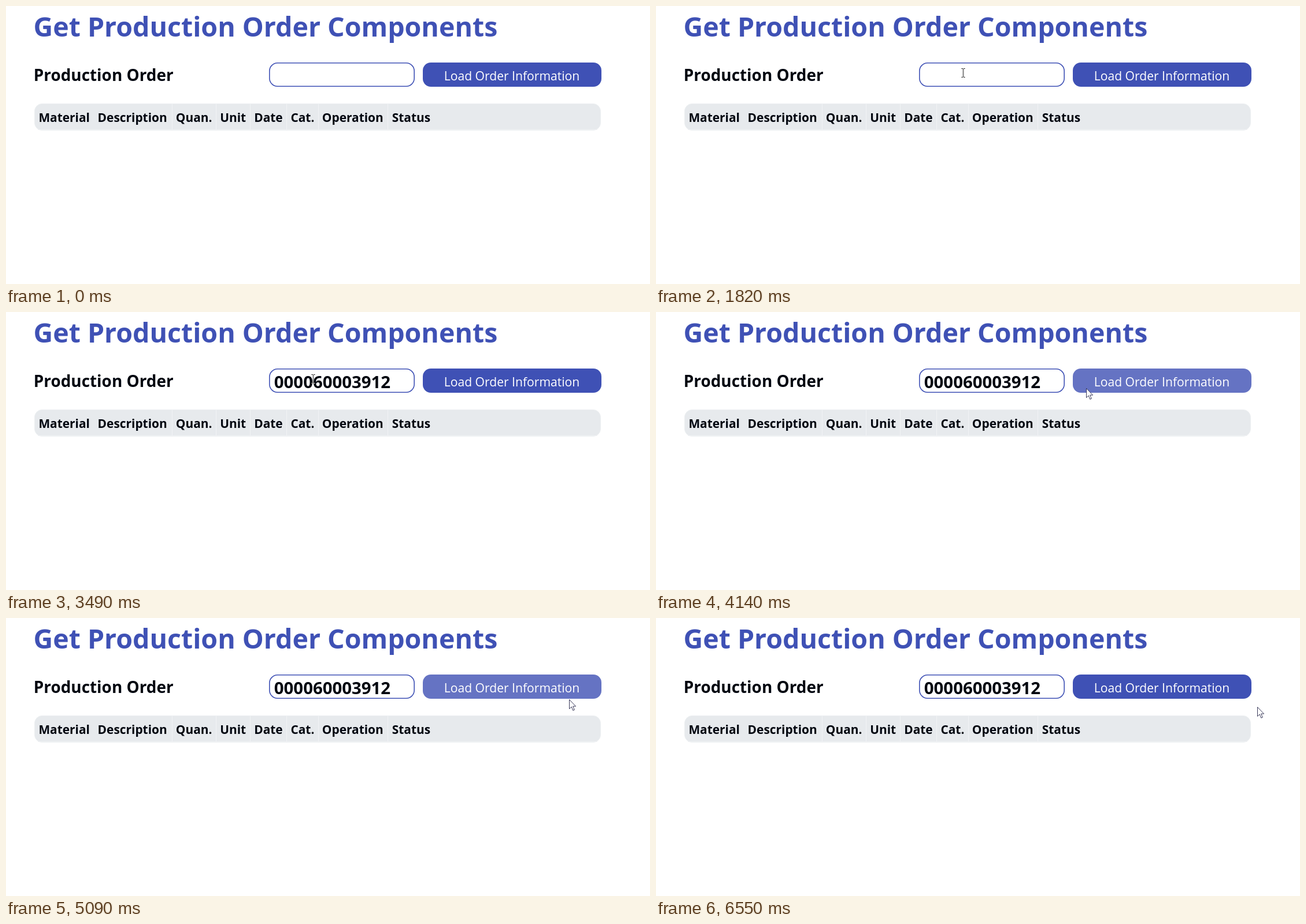
Animation of 1114x482 px, one loop 8000 ms. Source, as an HTML page:

```html
<!DOCTYPE html>
<html lang="en">
<head>
<meta charset="utf-8">
<title>Get Production Order Components</title>
<style>
  html, body { margin: 0; width: 100%; height: 100%; overflow: hidden; background: #fff; }
  svg { display: block; width: 100%; height: 100%; }
  text { font: 700 20.9px "Open Sans", "Noto Sans", sans-serif; fill: #00050f; white-space: pre; }
  .title { font-size: 46.5px; fill: #3f51b5; }
  .label { font-size: 27.9px; }
  .value { font-size: 29.4px; animation: value 8s step-end infinite; }
  .caption { font-size: 21.1px; font-weight: 400; fill: #fff; }
  .button { animation: button 8s step-end infinite; }
  .arrow { animation: move 8s infinite, arrow 8s step-end infinite; }
  .beam { mix-blend-mode: difference; animation: move 8s infinite, beam 8s step-end infinite; }
  .click { animation: click 8s step-end infinite; }

  @keyframes value {
    0% { visibility: hidden; }
    43.625%, 100% { visibility: visible; }
  }
  @keyframes button {
    0%, 64.5%, 100% { fill: #3f51b5; }
    51.75%, 62% { fill: #6573c3; }
    61.375% { fill: #8c97d3; }
  }
  @keyframes arrow {
    0%, 10.06% { visibility: hidden; }
    3.25%, 50.96%, 100% { visibility: visible; }
  }
  @keyframes beam {
    0%, 50.96%, 100% { visibility: hidden; }
    10.06% { visibility: visible; }
  }
  @keyframes click {
    0%, 17.75%, 29.375%, 62%, 100% { visibility: hidden; transform: translate(0, 0); }
    16.875% { visibility: visible; transform: translate(531px, 115px); }
    28.625% { visibility: visible; transform: translate(529px, 115px); }
    61.375% { visibility: visible; transform: translate(805px, 116px); }
  }
  @keyframes move {
    0% { transform: translate(983px, 429px); animation-timing-function: step-end; }
    3.25% { transform: translate(983px, 429px); animation-timing-function: steps(5); }
    7.51% { transform: translate(615px, 165px); animation-timing-function: steps(3); }
    10.06% { transform: translate(555px, 132px); animation-timing-function: steps(3); }
    12.625% { transform: translate(536.5px, 120px); animation-timing-function: step-end; }
    13.5% { transform: translate(535.5px, 117px); animation-timing-function: step-end; }
    14.375% { transform: translate(533.5px, 116px); animation-timing-function: step-end; }
    20.25% { transform: translate(532.5px, 116px); animation-timing-function: step-end; }
    22.75% { transform: translate(531.5px, 116px); animation-timing-function: step-end; }
    48.375% { transform: translate(545.5px, 117px); animation-timing-function: steps(3); }
    50.96% { transform: translate(715px, 133px); animation-timing-function: step-end; }
    51.75% { transform: translate(744px, 132px); animation-timing-function: steps(3); }
    54.375% { transform: translate(790px, 121px); animation-timing-function: steps(4); }
    57.875% { transform: translate(805px, 115px); animation-timing-function: step-end; }
    62% { transform: translate(811px, 117px); animation-timing-function: steps(2); }
    63.625% { transform: translate(974px, 141px); animation-timing-function: step-end; }
    64.5% { transform: translate(1012px, 149px); animation-timing-function: steps(3); }
    67% { transform: translate(1041px, 154px); animation-timing-function: step-end; }
    81.875%, 100% { transform: translate(1040px, 154px); animation-timing-function: step-end; }
  }
</style>
</head>
<body>
<svg viewBox="0 0 1114 482">
  <rect width="1114" height="482" fill="#fff"/>
  <text class="title" x="47.5" y="53">Get Production Order Components</text>
  <text class="label" x="47.8" y="130">Production Order</text>

  <rect x="455.8" y="98.8" width="250.4" height="40.4" rx="14" fill="#fff" stroke="#3f51b5" stroke-width="1.6"/>
  <text class="value" x="463.8" y="131.6">000060003912</text>

  <rect class="button" x="721" y="98" width="309" height="42" rx="14"/>
  <text class="caption" x="757.8" y="129">Load Order Information</text>

  <rect x="49.5" y="169.5" width="979" height="46" rx="13" fill="#e7eaed" stroke="#eceff1"/>
  <path d="M287.5 170v45M363.5 170v45M422.5 170v45M485.5 170v45M540.5 170v45M660.5 170v45M55 214.5h968" stroke="#f1f3f5"/>
  <text y="201"><tspan x="56.4">Material</tspan><tspan x="158.6">Description</tspan><tspan x="293.8">Quan.</tspan><tspan x="370.2">Unit</tspan><tspan x="429.2">Date</tspan><tspan x="492.4">Cat.</tspan><tspan x="546.8">Operation</tspan><tspan x="667.8">Status</tspan></text>

  <circle class="click" r="12" fill="#ff0" fill-opacity=".5"/>
  <path class="beam" d="M-3 -7.5h2l1 1 1 -1h2M0 -6.5v13M-3 7.5h2l1 -1 1 1h2" fill="none" stroke="#fff"/>
  <path class="arrow" d="M.5 .5v16l3.7-3.5 2.6 6.3 2.5-1.1-2.6-6.1h4.9z" fill="#fff" stroke="#26264a" stroke-width=".9"/>
</svg>
</body>
</html>
```
